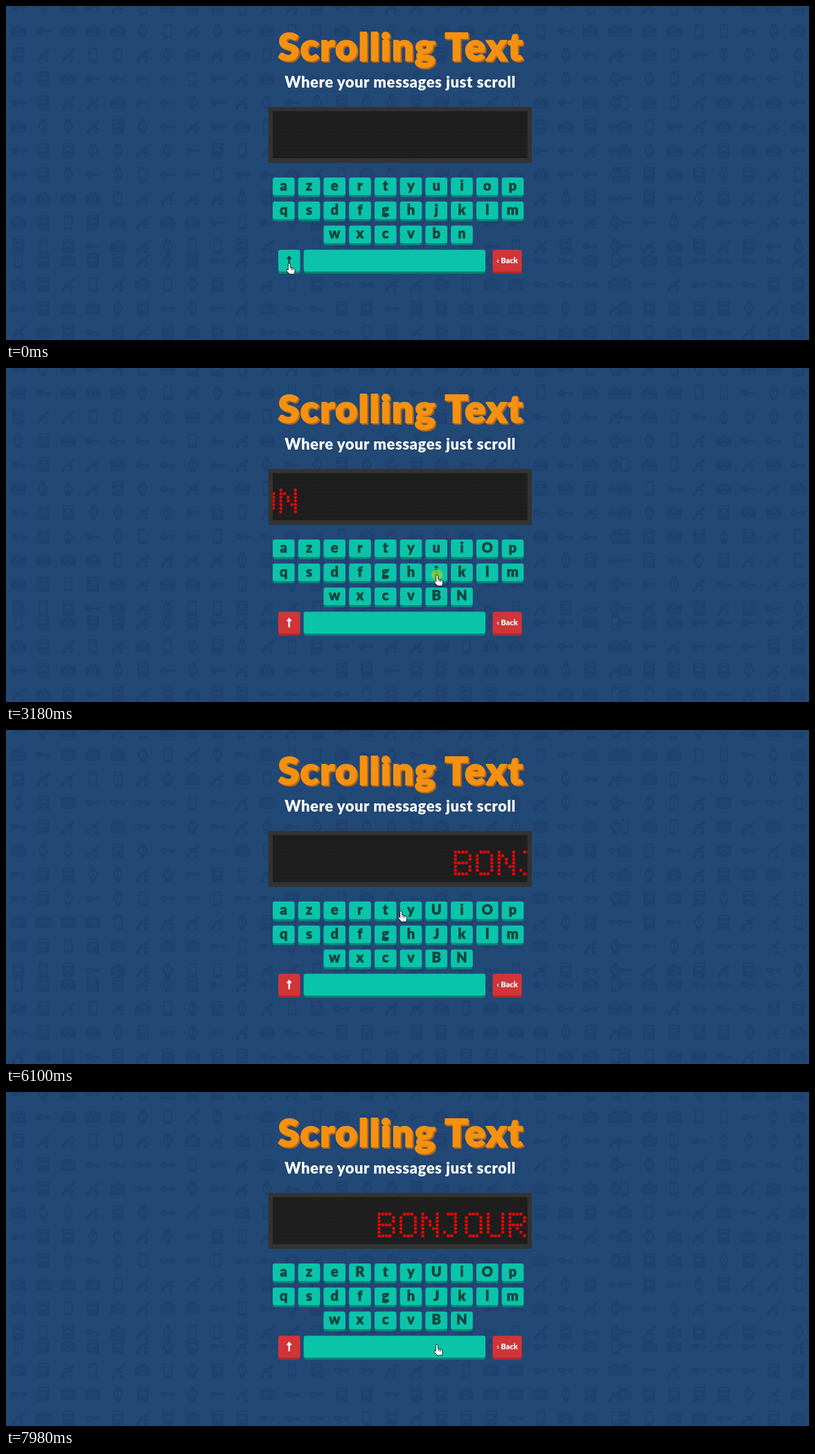
Write an HTML page that moves like this. It is 1159 by 483 pixels and loops after 8000 ms.

```html
<!DOCTYPE html>
<html lang="en">
<head>
<meta charset="utf-8">
<title>Scrolling Text</title>
<style>
html, body { margin: 0; height: 100%; overflow: hidden; background: #224876; }
svg { display: block; width: 100vw; height: 100vh; }
text { font-family: Lato, "Open Sans", sans-serif; font-weight: 900; text-anchor: middle; }
#title text { font-size: 55px; letter-spacing: 1.6px; stroke-width: 2px; paint-order: stroke; stroke-linejoin: round; }
#subtitle { font-size: 22px; letter-spacing: .55px; fill: #fff; }
.key text { font-size: 20px; fill: #12433f; stroke: #12433f; stroke-width: .5px; }
.key .face { fill: #0ac4aa; }
.key .edge { fill: #0a8574; }
.red .face { fill: #d13538; }
.red .edge { fill: #a92b31; }
.key .arrow { fill: none; stroke: #12433f; stroke-width: 2.4; }
.red .arrow { stroke: #fff; }
.key.red text { font-size: 11px; fill: #fff; stroke: none; }
#wallpaper { fill: #1f4270; }
.hole { fill: #224876; }
</style>
</head>
<body>
<svg viewBox="0 0 1159 483" preserveAspectRatio="none">
  <defs>
    <g id="key"><path d="M-2-1.6H12V1.6H9V4H6V1.6H-2z"/><ellipse cx="-6" rx="6" ry="4.6"/><circle class="hole" cx="-8" r="1.4"/></g>
    <g id="watch"><path d="M-3.5-11.5h7l1 6h-9zM-3.5 11.5h7l1-6h-9z"/><circle r="7.5"/><circle class="hole" r="5"/><path d="M-.7-4h1.4v4l2 2-1 1-2.4-2.5z"/></g>
    <g id="camera"><path d="M-11.5-6h5l2-3h9l2 3h5V9h-23z"/><circle class="hole" cy="1" r="5"/><circle cy="1" r="3.2"/></g>
    <g id="phone"><rect x="-6.5" y="-11.5" width="13" height="23" rx="2"/><path class="hole" d="M-5-8.5H5v16H-5z"/></g>
    <g id="stroller"><path d="M9-10l2 1-7 9 5 3-1 2-9-2-7 5-2-1 7-8-3-2 8-1z"/><circle cx="-8" cy="9" r="2.6"/><circle cx="5" cy="9" r="2.6"/></g>
    <g id="washer"><rect x="-9" y="-11.5" width="18" height="23" rx="1"/><path class="hole" d="M-7-9.5H7v2H-7z"/><circle class="hole" cy="2" r="6"/><path d="M-5 2q5-3 10 0a5 5 0 0 1-10 0z"/></g>
    <pattern id="dots" x="383.6" y="152.8" width="5.25" height="5.25" patternUnits="userSpaceOnUse"><circle cx="2.6" cy="2.6" r="2.2" fill="#1d1d1d"/></pattern>
    <clipPath id="panel"><path d="M385 152h367.5v68H385z"/></clipPath>
  </defs>
  <g id="wallpaper"></g>
  <g id="title">
    <text x="572" y="80.5" fill="#b2651c" stroke="#b2651c">Scrolling Text</text>
    <text x="570" y="78.5" fill="#f5910f" stroke="#f5910f">Scrolling Text</text>
  </g>
  <text id="subtitle" x="569" y="117.5">Where your messages just scroll</text>
  <path fill="#333" d="M378.5 146H759v81H378.5z"/>
  <path fill="#1f1f1f" d="M385 152h367.5v68H385z"/>
  <path fill="url(#dots)" d="M385 152h367.5v68H385z"/>
  <g clip-path="url(#panel)"><g id="message" fill="#f20505"></g></g>
  <g id="keys"></g>
  <circle id="ripple" r="8" fill="#8bd332"/>
  <path id="hand" fill="#fff" stroke="#111" stroke-width=".9" stroke-linejoin="round"
    d="M-1.5 9V1.3a1.5 1.5 0 0 1 3 0V6l5 1q1.7.4 1.7 2v3q0 1.6-1.3 3.6H.8L-3.7 11q-1-1.6 0-2.2t2.2 .9zM3 7v2.5M5.3 7.5V10"/>
</svg>
<script>
const LOOP = 8000, CELL = 5.25, RELEASE = 170, RIPPLE = 270;
const $ = id => document.getElementById(id);

// Wallpaper: a shuffled icon grid, tiled from x = 884 and y = 357
let seed = 7;
const random = () => (seed = seed * 16807 % 2147483647) / 2147483647;
const kinds = ['key', 'key', 'camera', 'camera', 'phone', 'stroller', 'washer', 'watch'];
let icons = '';
for (let r = 0; r < 15; r++) {
  for (let c = 0; c < 33; c++) {
    const x = 18 + c * 35.9 + (c > 24 ? -23 : 0);
    const y = 1.5 + r * 34.6 + (r > 10 ? -14 : 0);
    const kind = kinds[Math.floor(random() * kinds.length)];
    icons += `<use href="#${kind}" transform="translate(${x} ${y}) scale(.93)"/>`;
  }
}
$('wallpaper').innerHTML = icons;

// Keyboard
const keys = {};
function addKey(name, x, y, w, h, content, red) {
  const g = document.createElementNS('http://www.w3.org/2000/svg', 'g');
  g.setAttribute('class', red ? 'key red' : 'key');
  const rect = (cls, dy) => `<rect class="${cls}" x="${x}" y="${y + dy}" width="${w}" height="${h}" rx="3"/>`;
  g.innerHTML = `${rect('edge', 3)}<g>${rect('face', 0)}${content}</g>`;
  $('keys').append(g);
  keys[name] = { g, cap: g.lastChild, label: g.querySelector('text'), cx: x + w / 2, cy: y + h / 2 };
}
['azertyuiop', 'qsdfghjklm', '  wxcvbn'].forEach((row, r) => [...row].forEach((ch, i) => {
  if (ch === ' ') return;
  const x = 385 + i * 36.74, y = 248 + r * 34.7;
  addKey(ch, x, y, 31.5, 25.5, `<text x="${x + 15.7}" y="${y + 18.8}">${ch}</text>`);
}));
addKey('shift', 393, 352.5, 31.5, 31.5, '<path class="arrow" d="M408.7 375V363M405.8 366l2.9-3.2 2.9 3.2"/>');
addKey('space', 429.7, 352.5, 262.3, 31.5, '');
addKey('back', 702.5, 352.5, 42, 31.5, '<text x="723.5" y="372">‹ Back</text>', true);

// Dot-matrix letters: is the lamp at column c (0-4), row r (0-6) lit?
const bowl = (c, r) => c < 4 ? r % 3 === 0 : r % 3 > 0;
const lit = {
  B: (c, r) => c === 0 || bowl(c, r),
  O: (c, r) => (c % 4 === 0) !== (r % 6 === 0),
  N: (c, r) => c % 4 === 0 || c === Math.round(r * .75),
  J: (c, r) => c === 0 ? r === 5 : c < 3 ? r % 6 === 0 : c === 3 && r < 6,
  U: (c, r) => c % 4 === 0 ? r < 6 : r === 6,
  R: (c, r) => c === 0 || (r < 4 ? bowl(c, r) : c === r - 2)
};
$('message').innerHTML = [...'BONJOUR'].map((ch, n) => {
  let lamps = '';
  for (let c = 0; c < 5; c++) for (let r = 0; r < 7; r++) {
    if (lit[ch](c, r)) lamps += `<circle cx="${(n * 6 + c) * CELL}" cy="${176.4 + r * CELL}" r="2.25"/>`;
  }
  return `<g>${lamps}</g>`;
}).join('');

// time, key, aim relative to the key's centre
const clicks = [[70, 'shift', 0, 4], [1110, 'b', 0, 0], [1990, 'o', 7, -4], [2600, 'n', 0, 0],
  [3150, 'j', 1, 4], [4140, 'o', -1, 3], [5500, 'u', 8, 4], [6500, 'r', 1, -2]];
const stops = [...clicks, [7530, 'back', 48, 22], [8160, 'space', 61, -3]];

const smooth = u => u * u * (3 - 2 * u);
const clamp = u => Math.min(1, Math.max(0, u));

// The pointer sets off after a click and settles shortly before the next one
function pointer(t) {
  let x, y, last;
  for (const [time, name, dx, dy] of stops) {
    const tx = keys[name].cx + dx, ty = keys[name].cy + dy;
    if (last === undefined) [x, y] = [tx, ty];
    else {
      const start = Math.max(last + 200, time - 600);
      const u = smooth(clamp((t - start) / (time - 200 - start)));
      x += (tx - x) * u;
      y += (ty - y) * u;
    }
    last = time;
  }
  return [x, y];
}

// Column of the first letter: two passes, the first speeding up at the second letter
const column = t => Math.floor(t < 4000
  ? 9.5 - (t - 2080) / (t < 2080 ? 140 : 57)
  : 71.3 - (t - 4250) / 89.25);

function draw(t) {
  const [x, y] = pointer(t);
  $('hand').setAttribute('transform', `translate(${x} ${y})`);

  const active = clicks.find(([s]) => t >= s && t < s + RIPPLE);
  const age = active ? t - active[0] : RIPPLE;
  $('ripple').setAttribute('transform', `translate(${x} ${y})`);
  $('ripple').setAttribute('opacity', Math.min(.8, (RIPPLE - age) / 120));

  const typed = new Set(clicks.filter(([s]) => t >= s + RELEASE).map(c => c[1]));
  for (const [name, { g, cap, label }] of Object.entries(keys)) {
    const down = active && active[1] === name && age >= 70 && age < RELEASE;
    cap.setAttribute('transform', `translate(0 ${down ? 2 : 0})`);
    if (name === 'shift') g.classList.toggle('red', typed.has(name));
    else if (name.length === 1) label.textContent = typed.has(name) ? name.toUpperCase() : name;
  }

  $('message').setAttribute('transform', `translate(${386.2 + column(t) * CELL} 0)`);
  [...$('message').children].forEach((letter, n) => {
    letter.style.display = t >= clicks[n + 1][0] + RELEASE ? '' : 'none';
  });
}

function tick() {
  draw(performance.now() % LOOP);
  requestAnimationFrame(tick);
}
tick();
</script>
</body>
</html>
```
